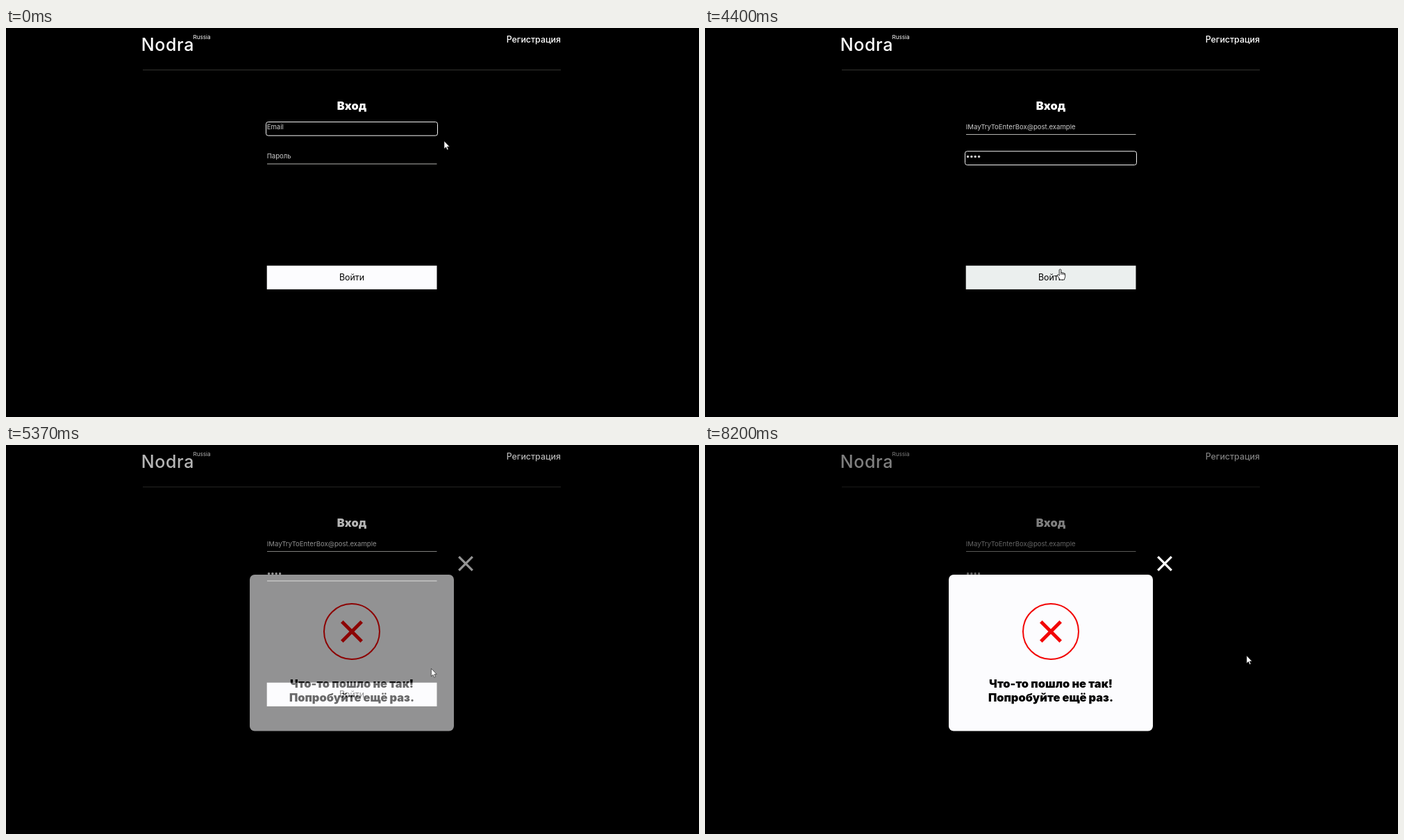
An HTML page that plays this animation: 998x561 px, repeating every 8230 ms.

```html
<!DOCTYPE html>
<html lang="ru">
<head>
<meta charset="utf-8">
<title>Вход</title>
<style>
  html, body { margin: 0; width: 100%; height: 100%; overflow: hidden; background: #000; }
  svg { display: block; width: 998px; height: 561px; font-family: Inter, "Open Sans", sans-serif; }
  .heavy { font-size: 16.4px; font-weight: 900; text-anchor: middle; }
  .label { font-size: 12.4px; }
  .input { font-size: 9.58px; fill: #ccc; }
  .focus { fill: none; stroke: #f4f4f4; }
  .line { stroke: #b4b4b0; }
</style>
</head>
<body>
<svg viewBox="0 0 998 561">
  <rect width="998" height="561"/>
  <g fill="#fff">
    <text x="194.8" y="32.5" font-size="25" font-weight="450" letter-spacing=".6">Nodra</text>
    <text x="269.5" y="16" font-size="8.1">Russia</text>
    <text x="799" y="21.4" class="label" font-weight="450" text-anchor="end">Регистрация</text>
    <path d="M197 60.5H799" stroke="#333330"/>
    <text x="498" y="118" class="heavy">Вход</text>
  </g>

  <path id="emailLine" class="line" d="M376 153.5H620.5"/>
  <rect id="emailFocus" class="focus" x="374.5" y="135.5" width="247" height="19.7" rx="3"/>
  <text id="email" class="input" x="375.7" y="146"></text>

  <path id="passLine" class="line" d="M376 196H620.5"/>
  <rect id="passFocus" class="focus" x="374.5" y="177.8" width="247" height="19.7" rx="3"/>
  <text id="passHint" class="input" x="375.7" y="188.3">Пароль</text>
  <g id="dots" fill="#ccc"></g>

  <rect id="button" x="375.7" y="342.7" width="244.8" height="34.2"/>
  <text x="498" y="364.2" class="label" text-anchor="middle">Войти</text>

  <g id="overlay">
    <rect width="998" height="561" fill-opacity=".5"/>
    <rect x="351" y="187" width="294" height="225.5" rx="7" fill="#fcfcfe"/>
    <path d="M652.2 161.2l19.6 19.6m0-19.6l-19.6 19.6" stroke="#fff" stroke-width="3.2"/>
    <g fill="none" stroke="#f20404">
      <circle cx="498" cy="269" r="40" stroke-width="2"/>
      <path d="M483.8 254.8l28.4 28.4m0-28.4l-28.4 28.4" stroke-width="5"/>
    </g>
    <text x="498" y="349.5" class="heavy">Что-то пошло не так!</text>
    <text x="498" y="369.5" class="heavy">Попробуйте ещё раз.</text>
  </g>

  <g id="cursor">
    <path id="arrow" d="M0 0V11.2L2.6 8.8L4.3 12.8L6.1 12L4.4 8.2H7.8Z" fill="#fff" stroke="#111" stroke-width=".6"/>
    <path id="beam" d="M-2.5-5H-.6L0-4.4L.6-5H2.5M0-4.4V4.8M-2.5 5.4H-.6L0 4.8L.6 5.4H2.5" fill="none" stroke="#bbb"/>
    <path id="hand" d="M-1.3 1Q0-.8 1.3 1V5.2Q2.6 4.4 3.5 5.6Q5 5 5.6 6.2Q7.2 5.8 7.2 7.6V11Q6.6 13 5.8 15.4H-.4Q-1.6 12.5-4 9.6Q-4.6 8-3 7.8L-1.3 9.4ZM1.3 5V8M3.5 5.6V8.2M5.6 6.2V8.6" fill="#fff" stroke="#111" stroke-width=".9" stroke-linejoin="round"/>
  </g>
</svg>

<script>
const LOOP = 8230;
const EMAIL = 'IMayTryToEnterBox@post.example';
const at = { paste: 1200, passFocus: 2350, submit: 4470, popup: 5080, fade: 500 };
const keyTimes = [2900, 3040, 3180, 3320];

// Pointer stops: time, x, y
const path = [
  [30, 631, 163], [630, 588, 147], [1670, 588, 147], [2300, 536, 193],
  [3400, 536, 193], [3600, 533, 244], [3630, 532, 250], [4250, 511.5, 347.7],
  [5050, 511.5, 347.7], [5200, 536, 341], [5370, 612, 322.5], [5600, 695, 312],
  [5830, 744, 307], [6200, 766, 305], [6480, 785, 304], [6690, 779.5, 303.5],
  [6770, 780, 303.7]
];

const $ = id => document.getElementById(id);
const show = (id, on) => $(id).setAttribute('visibility', on ? 'visible' : 'hidden');
const clamp = v => Math.max(0, Math.min(1, v));
const inside = ([x, y], l, t, r, b) => x >= l && x <= r && y >= t && y <= b;

for (let i = 0; i < keyTimes.length; i++) {
  const dot = document.createElementNS('http://www.w3.org/2000/svg', 'circle');
  dot.setAttribute('cx', 378.5 + i * 5.35);
  dot.setAttribute('cy', 185.6);
  dot.setAttribute('r', 1.75);
  $('dots').append(dot);
}

// Cubic interpolation; rest points on either side of a pause keep zero speed
function pointer(t) {
  const last = path.length - 1;
  if (t <= path[0][0]) return path[0].slice(1);
  if (t >= path[last][0]) return path[last].slice(1);
  const i = path.findIndex(p => p[0] > t) - 1;
  const a = path[i], b = path[i + 1], span = b[0] - a[0];
  const u = (t - a[0]) / span;
  const slope = (k, c) => {
    if (k === 0 || k === last) return 0;
    const p = path[k - 1], q = path[k], n = path[k + 1];
    const before = (q[c] - p[c]) / (q[0] - p[0]);
    const after = (n[c] - q[c]) / (n[0] - q[0]);
    return before * after <= 0 ? 0 : 2 * before * after / (before + after);
  };
  return [1, 2].map(c =>
    a[c] + (b[c] - a[c]) * u * u * (3 - 2 * u) +
    span * (slope(i, c) * u * (1 - u) ** 2 - slope(i + 1, c) * u * u * (1 - u)));
}

function cursorKind(pos, popup) {
  if (popup) return inside(pos, 408, 334, 588, 374) ? 'beam' : 'arrow';
  if (inside(pos, 376, 343, 620, 377)) return 'hand';
  const onField = inside(pos, 376, 136, 620, 155) || inside(pos, 376, 178, 620, 198);
  return onField ? 'beam' : 'arrow';
}

function render(t) {
  const emailFocus = t < at.passFocus;
  const passFocus = !emailFocus && t < at.submit;
  show('emailFocus', emailFocus);
  show('emailLine', !emailFocus);
  show('passFocus', passFocus);
  show('passLine', !passFocus);

  $('email').textContent = t < at.paste ? 'Email' : EMAIL;
  show('passHint', t < keyTimes[0]);
  [...$('dots').children].forEach((dot, i) =>
    dot.setAttribute('visibility', t >= keyTimes[i] ? 'visible' : 'hidden'));

  const popup = t >= at.popup;
  $('overlay').setAttribute('opacity', clamp((t - at.popup) / at.fade));

  const pos = pointer(t);
  const kind = cursorKind(pos, popup);
  $('button').setAttribute('fill', kind === 'hand' ? '#ebefee' : '#fcfcfe');
  $('cursor').setAttribute('transform', `translate(${pos})`);
  for (const id of ['arrow', 'beam', 'hand']) show(id, id === kind);
}

const start = performance.now();
function tick() {
  render((performance.now() - start) % LOOP);
  requestAnimationFrame(tick);
}
tick();
</script>
</body>
</html>
```
